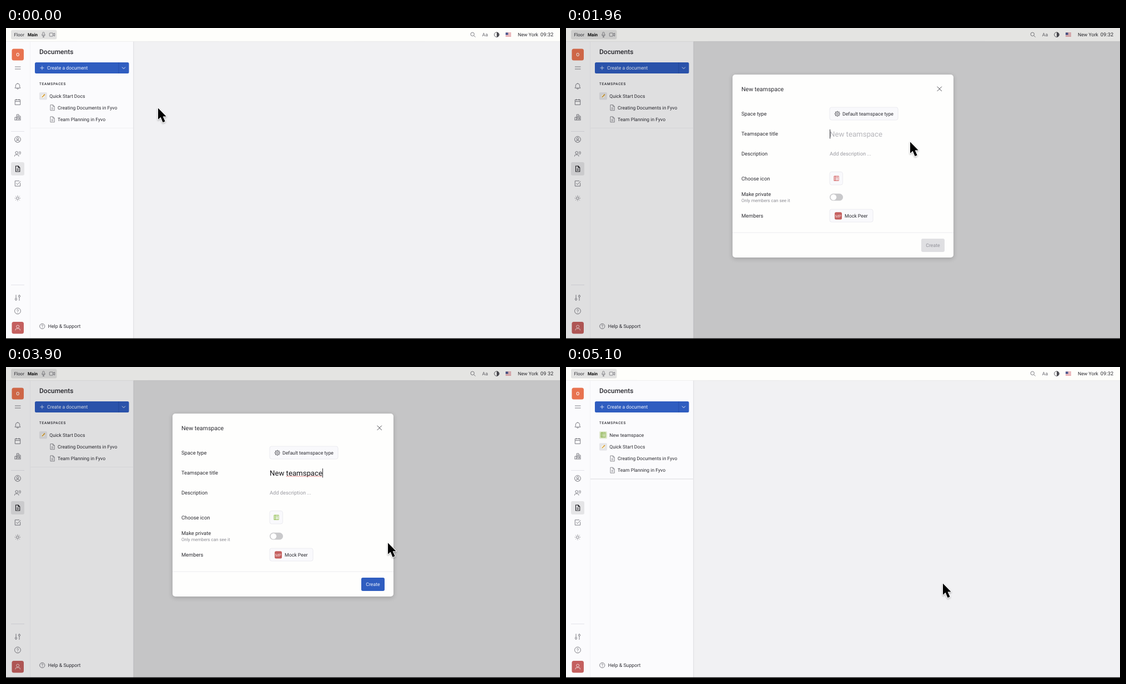
An HTML page with a canvas that plays this animation: 998x561 px, repeating every 5.3 s.

```html
<!DOCTYPE html>
<html lang="en">
<head>
<meta charset="utf-8">
<style>
html, body { margin: 0; width: 100%; height: 100%; overflow: hidden; background: #f1f1f3; }
canvas { display: block; }
</style>
</head>
<body>
<canvas id="stage" width="998" height="561"></canvas>
<script>
const ctx = document.getElementById('stage').getContext('2d');
const LOOP = 5300;
const INK = '#2c2c32', GREY = '#717178', BLUE = '#2f5dc0', RED = '#c4605f';
const TITLE = 'New teamspace';
const ICON_COLORS = ['#d0504f', '#86b93b', '#4a86d0', '#dc8a3c', '#8e62c4', '#43a262'];
const COLON_FLIPS = [160, 660, 1160, 1660, 2160, 2660, 3160, 3500, 3800, 4330, 4830, 5100];
const KEY_TIMES = [2200, 2310, ...Array.from({ length: 9 }, (_, i) => 2530 + i * 65), 3110, 3200];

// Pointer moves: start, end, from, control, to, easing
const inOut = u => u * u * (3 - 2 * u);
const out = u => 1 - Math.pow(1 - u, 1.45);
const MOVES = [
  [30, 530, [274, 145], [240, 105], [211, 71], inOut],
  [640, 1060, [211, 71], [250, 120], [317, 133], inOut],
  [1390, 1850, [317, 133], [460, 180], [620, 206], inOut],
  [3700, 4170, [620, 206], [721, 317], [679, 391], out]
];

const clamp = v => Math.max(0, Math.min(1, v));

function text(str, x, y, size, color = INK, weight = 400, align = 'left') {
  ctx.font = `${weight} ${size}px Roboto, sans-serif`;
  ctx.textRendering = 'geometricPrecision';
  ctx.textAlign = align;
  ctx.fillStyle = color;
  ctx.fillText(str, x, y + size * 0.355);
}

function box(x, y, w, h, r, fill, stroke, width = 0.8) {
  ctx.beginPath();
  ctx.roundRect(x, y, w, h, r);
  if (fill) { ctx.fillStyle = fill; ctx.fill(); }
  if (stroke) { ctx.strokeStyle = stroke; ctx.lineWidth = width; ctx.stroke(); }
}

function path(d, color = GREY, width = 0.9) {
  ctx.strokeStyle = color;
  ctx.lineWidth = width;
  ctx.stroke(new Path2D(d));
}

function ring(x, y, r, color = GREY, width = 0.9, from = 0, to = 7) {
  ctx.beginPath();
  ctx.arc(x, y, r, from, Math.min(to, from + Math.PI * 2));
  ctx.strokeStyle = color;
  ctx.lineWidth = width;
  ctx.stroke();
}

function disc(x, y, r, color) {
  ctx.beginPath();
  ctx.arc(x, y, r, 0, Math.PI * 2);
  ctx.fillStyle = color;
  ctx.fill();
}

function at(x, y, draw) {
  ctx.save();
  ctx.translate(x, y);
  draw();
  ctx.restore();
}

function spokes(n, r1, r2, color, width) {
  for (let i = 0; i < n; i++) {
    const a = i * Math.PI * 2 / n, c = Math.cos(a), s = Math.sin(a);
    path(`M${c * r1} ${s * r1}L${c * r2} ${s * r2}`, color, width);
  }
}

function sheetIcon(color, width) {
  path('M1 -5H-3.5V5H3.8V-2.2L1 -5V-2.2H3.8M-1.6 .3H1.8M-1.6 2.5H1.8', color, width);
}

function personIcon(color) {
  ring(0, -2, 2.5, color);
  path('M-4.2 5V4Q-4.2 1.8 -2 1.8H2Q4.2 1.8 4.2 4V5', color);
}

function helpIcon(r) {
  ring(0, 0, r);
  path('M-1.5 -1.2Q-1.4 -2.6 0 -2.6Q1.6 -2.5 1.5 -1.1Q1.3 -.2 0 .3V1.2', GREY, 0.8);
  disc(0, 2.6, 0.5, GREY);
}

function spaceIcon(color) {
  path('M-4.2 -4L-2 -4.3V4.2H-4.2ZM-2 -4.2H4.2V4.2H-2ZM1.2 -2.5V4M-.4 -2.4H2.8', color, 0.8);
}

function topBar(colon) {
  box(0, 0, 998, 24, 0, '#fefefb');
  box(9, 3.5, 82.5, 17, 3, '#e3e3e2');
  text('Floor', 14.5, 12, 8.1);
  text('Main', 39, 12, 8.1, '#111', 700);
  at(67.5, 12, () => {
    box(-1.6, -4.5, 3.2, 6, 1.6, null, GREY);
    path('M-3 -.5Q-3 2.7 0 2.7Q3 2.7 3 -.5M0 2.7V4.5M-1.5 4.5H1.5', GREY, 0.8);
  });
  at(83, 12, () => {
    box(-4.7, -3, 6.3, 6, 1, null, GREY);
    path('M1.6 -.8L4.7 -2.6V2.6L1.6 .8', GREY);
  });
  ring(840.3, 11.2, 3.2);
  path('M842.7 13.6L845.6 16.5');
  text('Aa', 863, 12, 8.6, '#66666d', 400, 'center');
  ring(884, 12, 4.3, '#4d4d53');
  ctx.beginPath();
  ctx.arc(884, 12, 4.3, -Math.PI / 2, Math.PI / 2);
  ctx.fillStyle = '#4d4d53';
  ctx.fill();
  for (let i = 0; i < 7; i++) box(900, 8.4 + i, 10, 1, 0, i % 2 ? '#f4eeee' : '#d6606a');
  box(900, 8.4, 4.6, 4, 0, '#4a5a92');
  text('New York', 922, 12, 8.7);
  text('09', 962.8, 12, 9.2);
  if (colon) text(':', 974.5, 12, 9.2, INK, 400, 'center');
  text('32', 975.8, 12, 9.2);
}

function rail() {
  box(10.5, 37.5, 21.5, 21, 3.5, '#e87350');
  text('O', 21.2, 48, 8.6, '#fff', 500, 'center');
  path('M16 70H26.5M16 74H26.5');
  at(21, 105, () => path('M-5 3.2H5L3.7 1.4V-1.2Q3.5 -4.6 0 -4.8Q-3.5 -4.6 -3.7 -1.2V1.4ZM0 -4.8V-5.7M-1.7 3.4Q-1.5 5.2 0 5.2Q1.5 5.2 1.7 3.4'));
  at(21, 133.5, () => path('M-4.7 -4H4.7V5H-4.7ZM-4.7 -1H4.7M-2.4 -5.5V-2.8M2.4 -5.5V-2.8'));
  at(21, 161, () => path('M-5 5V0H-1.7V5M-1.7 5V-5H2V5M2 -2H5V5M-5.7 5H5.7M.1 -3V3M3.5 0V3.4'));
  path('M9 186.5H33M9 463.5H33', '#e3e3e7');
  at(21, 201, () => {
    ring(0, 0, 5.4);
    ring(0, -1.3, 1.9);
    path('M-3.4 4Q-3 1.7 -1 1.7H1Q3 1.7 3.4 4');
  });
  at(21, 227, () => {
    ring(-1.8, -2, 2.3);
    path('M-5.5 4.7V3.7Q-5.3 1.7 -3.4 1.7H-.2Q1.7 1.7 1.9 3.7V4.7M2 -4.2Q3.4 -3.4 3.2 -1.8Q3 -.3 1.8 .2M3.8 -4.8Q5.6 -3.6 5.4 -1.6Q5.2 .4 3.5 1.5');
  });
  box(9, 242, 24, 24, 3, '#e5e5e7');
  at(21, 254, () => sheetIcon('#1d1d22', 1.1));
  at(21, 280.5, () => path('M4.7 -1V4.7H-4.7V-4.7H3M-2.5 -.5L-.3 1.8L5.2 -4.2'));
  at(21, 307, () => {
    ring(0, 0, 2.3);
    spokes(8, 3.9, 5.1, GREY, 0.9);
  });
  at(21, 486.5, () => {
    path('M-3 -5.2V1M-3 4.4V5.4M3 5.4V-1M3 -4.4V-5.4');
    ring(-3, 2.7, 1.6);
    ring(3, -2.7, 1.6);
  });
  at(21, 510.5, () => helpIcon(5.4));
  box(10.5, 530, 21.5, 21.5, 3.5, RED);
  at(21.2, 540.5, () => personIcon('#f7e6e6'));
}

function panel(added) {
  text('Documents', 60, 43, 12, INK, 500);
  box(52, 62, 169.5, 20, 2.5, BLUE);
  path('M65 68.5V75.5M61.5 72H68.5', '#dbe4f8');
  text('Create a document', 74, 72, 8.7, '#f0f4fd');
  path('M203 62V82', '#244da6', 0.8);
  path('M209 70.6L212 73.6L215 70.6', '#e6edfb', 1);
  ctx.letterSpacing = '0.75px';
  text('TEAMSPACES', 60, 101, 6.4, INK, 500);
  ctx.letterSpacing = '0px';
  let y = 122.5;
  if (added) {
    box(60, 116, 14, 13.5, 2, '#dfe8cd');
    at(67, 122.5, () => spaceIcon('#78a832'));
    text(TITLE, 78.3, y, 8.65);
    y += 21.3;
  }
  box(60, y - 6.5, 14, 13.5, 2, '#e6e6e9');
  at(67, y, () => {
    box(-3.3, -2.5, 6, 6, 0.5, '#fdfcf4', '#d5d2c2', 0.5);
    path('M-1.8 2.2L3 -2.8', '#d79a2f', 1.7);
  });
  text('Quick Start Docs', 78.3, y, 8.65);
  ['Creating Documents in Fyvo', 'Team Planning in Fyvo'].forEach((name, i) => {
    const row = y + 21.2 * (i + 1);
    at(83.5, row, () => sheetIcon(GREY, 0.8));
    text(name, 93, row, 8.65);
  });
  const rule = added ? 202 : 180.5;
  path(`M44 ${rule}H229`, added ? '#dadade' : '#f0f0f3', 1);
  at(65.3, 538, () => helpIcon(4.6));
  text('Help & Support', 75.7, 538, 8.75);
}

function dropdown() {
  ctx.save();
  ctx.shadowColor = 'rgba(0,0,0,.14)';
  ctx.shadowBlur = 6;
  ctx.shadowOffsetY = 2;
  box(203, 85, 160, 60, 4, '#fefefe');
  ctx.restore();
  box(203, 85, 160, 60, 4, null, '#e2e2e6');
  text('Create a document', 214, 103, 8.7);
  text('Create teamspace', 214, 127, 8.7);
}

function shade(alpha) {
  const cover = (x, y, w, h, a) => box(x, y, w, h, 0, `rgba(0,0,0,${a * alpha})`);
  cover(0, 0, 998, 24, 0.1);
  cover(0, 24, 230, 536, 0.115);
  cover(230, 24, 768, 536, 0.185);
}

function createButton(t, typed) {
  if (t >= 4400) {
    box(624, 380, 58, 24, 3, '#bac5da');
    const turn = (t - 4760) / 1000 * Math.PI * 2;
    ring(637.3, 392, 4.7, '#8795b4', 1, turn + 1, turn + 5.2);
    text('Create', 647.7, 392, 8.7, '#8593b1');
    return;
  }
  box(640, 380, 42, 24, 3, '#dfdfe2');
  const on = typed ? clamp((t - KEY_TIMES[0]) / 150) : 0;
  ctx.save();
  ctx.globalAlpha *= on;
  box(640, 380, 42, 24, 3, BLUE);
  ctx.restore();
  text('Create', 661, 392, 8.7, on > 0.5 ? '#f0f4fd' : '#919198', 400, 'center');
}

function titleField(t, typed) {
  const value = TITLE.slice(0, typed);
  text(value || TITLE, 475, 191.3, 13.2, value ? '#17171b' : '#b5b5ba');
  const end = 475 + ctx.measureText(value).width;
  if (t >= 4330) return;
  if (t >= 3700) {
    ctx.setLineDash([1.4, 1]);
    path(`M505 197.3H${end}`, '#d8484a', 1.1);
    ctx.setLineDash([]);
  }
  path(`M${end + 0.6} 183V199.5`, '#17171b', 0.9);
}

function dialog(t) {
  const typed = KEY_TIMES.filter(k => t >= k).length;
  ctx.save();
  ctx.shadowColor = 'rgba(0,0,0,.2)';
  ctx.shadowBlur = 8;
  ctx.shadowOffsetY = 2;
  box(300, 84, 398, 330, 5, '#fefefd');
  ctx.restore();
  text(TITLE, 316, 110, 10.6);
  path('M668.7 105.7L676.9 113.9M676.9 105.7L668.7 113.9', '#4d4d53', 1);
  [['Space type', 155], ['Teamspace title', 191], ['Description', 227], ['Choose icon', 271.5],
    ['Make private', 300], ['Members', 339]].forEach(([label, y]) => text(label, 316, y, 9.3));
  text('Only members can see it', 316, 311, 8, '#8d8d94');

  const chip = (y, w, h) => box(475, y, w, h, 3.5, '#f9f9fc', '#e8e8ed');
  chip(143, 123, 23);
  at(488.8, 154.8, () => {
    ring(0, 0, 1.6, '#55555c');
    ring(0, 0, 3.8, '#55555c');
    spokes(8, 3.8, 5, '#55555c', 1.3);
  });
  text('Default teamspace type', 498, 154.8, 8.72);
  titleField(t, typed);
  text('Add description ...', 475, 227, 9.3, '#9a9aa1');
  chip(259.5, 23.5, 23.5);
  at(487, 271.3, () => spaceIcon(ICON_COLORS[typed % ICON_COLORS.length]));
  box(475, 298.8, 24, 12.8, 6.4, '#c9c9cb');
  disc(481.9, 305.2, 5.3, '#fff');
  chip(327, 78, 23);
  box(484, 332.3, 13, 13.2, 2.5, RED);
  text('MP', 490.4, 339, 7.2, '#f7e2e2', 400, 'center');
  text('Mock Peer', 502, 339, 8.75);
  path('M300 369H698', '#ececef', 1);
  createButton(t, typed);
}

function pointer(t) {
  let pos = MOVES[0][2];
  for (const [start, end, a, c, b, ease] of MOVES) {
    if (t < start) break;
    const u = ease(clamp((t - start) / (end - start))), v = 1 - u;
    pos = a.map((p, i) => v * v * p + 2 * u * v * c[i] + u * u * b[i]);
  }
  at(pos[0], pos[1], () => {
    const arrow = new Path2D('M0 -.5V20L4.6 15.8L8.6 25.3L12.6 23.6L8.6 14.5H14.6Z');
    ctx.lineJoin = 'round';
    ctx.shadowColor = 'rgba(0,0,0,.3)';
    ctx.shadowBlur = 3;
    ctx.shadowOffsetY = 1.5;
    ctx.strokeStyle = '#fff';
    ctx.lineWidth = 2;
    ctx.stroke(arrow);
    ctx.shadowColor = 'transparent';
    ctx.fillStyle = '#000';
    ctx.fill(arrow);
  });
}

function render(t) {
  box(0, 0, 998, 561, 0, '#f1f1f3');
  box(0, 24, 230, 537, 0, '#fbfbfd');
  path('M43.5 25V560', '#f3f3f6', 1);
  path('M229.8 24V560', '#dcdce0', 1);
  topBar(COLON_FLIPS.filter(f => t >= f).length % 2 === 0);
  path('M0 24.3H998', '#eaeaea', 0.8);
  rail();
  panel(t >= 4560);
  if (t >= 600 && t < 1330) dropdown();
  const alpha = t < 4800 ? clamp((t - 1330) / 230) : clamp((4830 - t) / 60);
  if (alpha > 0) {
    shade(alpha);
    ctx.save();
    ctx.globalAlpha = alpha;
    dialog(t);
    ctx.restore();
  }
  box(0, 559.7, 998, 1.3, 0, '#0c0c0d');
  pointer(t);
}

const origin = performance.now();
function tick() {
  render((performance.now() - origin) % LOOP);
  requestAnimationFrame(tick);
}
tick();
</script>
</body>
</html>
```
